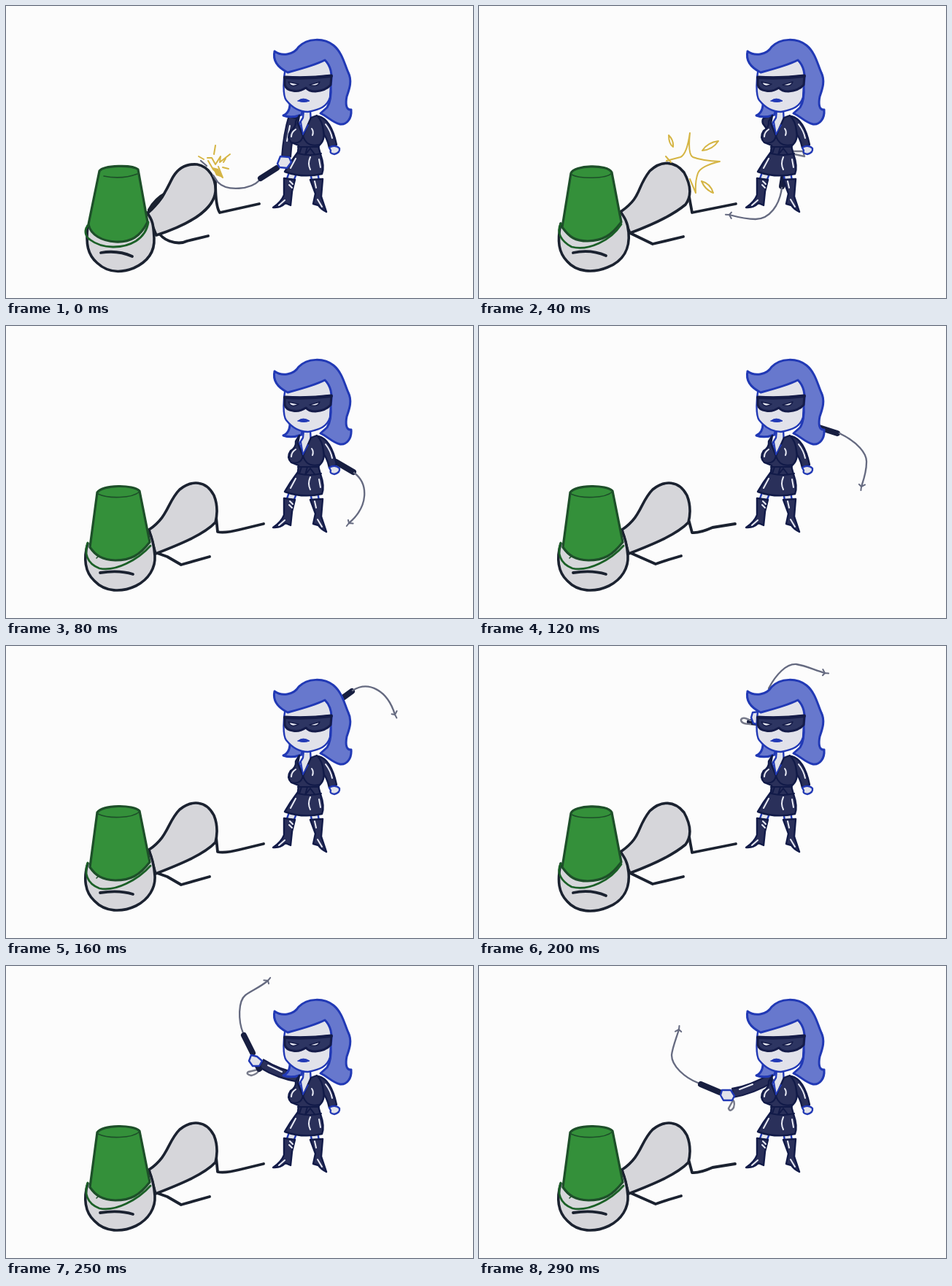
These frames come from a looping animation (640x400 px, 0.33 s). An HTML page:

```html
<!DOCTYPE html>
<html lang="en">
<head>
<meta charset="utf-8">
<title>Whip crack</title>
<style>
html, body { margin: 0; width: 100%; height: 100%; overflow: hidden; background: #fcfcfc; }
svg { display: block; width: 100%; height: 100%; }
path { stroke-linecap: round; stroke-linejoin: round; fill: none; }

/* One pose is visible for its own slice of the 330 ms loop. */
.pose { visibility: hidden; animation: show 330ms step-end calc((var(--at) - 330) * 1ms) infinite; }
.pose.long { animation-name: show-long; }
@keyframes show { 0% { visibility: visible; } 12.1212%, 100% { visibility: hidden; } }
@keyframes show-long { 0% { visibility: visible; } 15.1515%, 100% { visibility: hidden; } }

.body { fill: #d6d6da; stroke: #1b2230; stroke-width: 3.6; }
.shade { fill: #1b2230; stroke: #1b2230; stroke-width: 2; }
.limb { stroke: #1b2230; stroke-width: 3.8; }
.bucket { fill: #34903a; stroke: #1d4f29; stroke-width: 3.2; }
.rim { stroke: #1d4f29; stroke-width: 1.6; }
.strap { stroke: #1b6027; stroke-width: 2.8; }

.hair { fill: #6778cd; stroke: #2139b5; stroke-width: 3; }
.skin { fill: #e1e2ea; stroke: #2139b5; stroke-width: 2.4; }
.neck { stroke: #2139b5; stroke-width: 1.8; }
.suit { fill: #2a305a; stroke: #111a48; stroke-width: 2.4; }
.mask { fill: #2d3562; stroke: #151c49; stroke-width: 3; }
.band { stroke: #151c49; stroke-width: 4; }
.eyes { fill: #e8eaf4; stroke: #151c49; stroke-width: 1.5; }
.lips { fill: #2139b5; stroke: #2139b5; }
.seam { stroke: #111a48; stroke-width: 2; }
.shine { stroke: #e8eaf4; stroke-width: 2; }
.sleeve { stroke: #151c49; stroke-width: 14; stroke-linecap: butt; }
.sleeve + .sleeve { stroke: #2a305a; stroke-width: 9.5; }

.grip { stroke: #171e40; stroke-width: 8; }
.lash { stroke: #656a80; stroke-width: 2.3; }
.tail { marker-end: url(#fork); }
.loop { stroke: #777a8a; stroke-width: 2.4; }
.spark { stroke: #d5b544; stroke-width: 2; }
.ember { fill: #d5b544; }
</style>
</head>
<body>
<svg viewBox="0 0 640 400">
<defs>
  <marker id="fork" viewBox="-8 -8 16 16" markerWidth="16" markerHeight="16" markerUnits="userSpaceOnUse" orient="auto">
    <path d="M-4-4 0 0 5-1M0 0-2 4" stroke="#656a80" stroke-width="2"/>
  </marker>

  <g id="man-hit">
    <path class="limb" d="M287 240Q287 275 293 283L347 271M208 308Q213 318 224 322 238 327 248 322L277 315"/>
    <path class="body" d="M194 284C216 265 222 246 229 234 238 219 250 216 262 217 278 220 288 236 287 254 285 276 258 297 206 314Z"/>
    <path class="shade" d="M195 279Q204 263 218 256 212 270 195 281Z"/>
    <path class="body" d="M112 301C109 326 112 341 125 352 139 365 157 366 175 359 195 350 204 337 203 318 202 302 202 294 193 283"/>
    <path class="bucket" d="M128 226C134 218 174 217 181 224L194 296C184 316 171 324 150 323 132 322 116 314 113 299Z"/>
    <path class="rim" d="M134 233Q159 238 180 230"/>
    <path class="strap" d="M112 301C107 307 108 315 115 320 132 333 160 333 178 322Q193 312 195 296"/>
    <path class="limb" d="M130 338Q153 334 173 343"/>
  </g>

  <g id="man-b">
    <path class="limb" d="M288 261 292 283 352 271M207 311 238 326 280 316"/>
    <path class="body" d="M194 282C224 261 215 250 234 226 250 211 268 212 281 228 291 246 291 261 283 272 264 288 234 301 207 311Z"/>
    <path class="body" d="M112 298C107 322 109 338 121 350 134 365 157 366 176 358 199 349 207 331 205 310 204 296 199 289 194 282"/>
    <path class="bucket" d="M126 229C130 218 176 216 182 228L195 296C181 315 170 321 149 322 132 322 124 317 114 303Z"/>
    <path class="rim" d="M127 231C138 237 174 237 182 229"/>
    <path class="strap" d="M112 298C106 310 112 322 127 330 150 336 181 321 195 299"/>
    <path class="limb" d="M129 338Q153 333 174 342"/>
  </g>

  <g id="man-core">
    <path class="body" d="M196 279C223 261 221 241 238 224 254 211 274 211 285 232 291 247 289 261 287 269 271 286 236 300 205 312Z"/>
    <path class="body" d="M112 298C106 318 108 337 121 349 136 365 159 365 178 356 196 347 205 331 204 315 203 302 201 291 196 281"/>
    <path class="bucket" d="M125 228C133 217 175 217 183 226L197 296C183 314 171 321 150 321 132 320 123 315 115 303Z"/>
    <path class="rim" d="M126 230C141 237 173 236 183 227"/>
    <path class="strap" d="M112 297C107 310 110 325 128 332 150 337 181 320 198 301"/>
    <path class="limb" d="M129 338Q155 334 174 340"/>
    <path class="rim" d="M124 318 126 316"/>
  </g>
  <g id="man-c">
    <path class="limb" d="M288 268 292 283Q302 284 320 276L351 271M208 311 242 326 260 320 277 315"/>
    <use href="#man-core"/>
  </g>
  <g id="man-d">
    <path class="limb" d="M288 262 290 282Q300 284 320 279L353 271M207 311 221 316 240 327 279 316"/>
    <use href="#man-core"/>
  </g>
</defs>

<g class="pose" style="--at:40">
  <use href="#man-b"/>
  <path class="suit" d="M400 152Q386 151 389 161L397 172Z"/>
  <path class="grip" d="M417 235 415 247"/>
  <path class="lash tail" d="M415 249C412 273 398 292 379 292 365 292 354 289 343 286"/>
  <path class="loop" d="M430 199 444 199 446 206 432 203"/>
  <path class="spark" d="M289 174Q285 203 276 207L257 212M289 174Q286 203 293 207 306 212 330 213 304 219 300 229 296 240 297 256L289 237M256 206 263 214M260 177Q267 184 266 193 260 189 260 177ZM306 198Q313 187 328 185 320 197 306 198ZM305 240Q317 243 321 256 310 252 305 240Z"/>
</g>

<g class="pose" style="--at:80">
  <use href="#man-d"/>
  <path class="grip" d="M452 186 476 200"/>
  <path class="lash tail" d="M477 201C497 216 497 247 470 270"/>
</g>

<g class="pose" style="--at:120">
  <use href="#man-c"/>
  <path class="grip" d="M463 138 491 147"/>
  <path class="lash tail" d="M494 147C519 159 532 175 531 187 531 200 527 211 524 220"/>
</g>

<g class="pose" style="--at:160">
  <use href="#man-d"/>
  <path class="grip" d="M452 78 474 62"/>
  <path class="lash tail" d="M475 61C497 47 523 61 533 94"/>
</g>

<g class="pose long" style="--at:200">
  <use href="#man-b"/>
  <path class="lash tail" d="M397 58C407 39 421 24 435 25 448 27 460 33 474 37"/>
  <path class="grip" d="M371 104 380 105"/>
  <path class="loop" d="M372 107Q359 107 359 101 361 96 372 102"/>
  <path class="skin" d="M384 90 375 91 373 98 376 106 385 108Z"/>
</g>

<g class="pose" style="--at:250">
  <use href="#man-d"/>
  <path class="lash tail" d="M325 92C318 75 318 48 328 40 337 33 347 30 359 20"/>
  <path class="loop" d="M346 140Q348 147 336 150 328 148 332 145L345 142"/>
  <path class="sleeve" d="M402 153Q375 149 349 133"/><path class="sleeve" d="M402 153Q375 149 351 134"/>
  <path class="shine" d="M359 136 378 145"/>
  <path class="grip" d="M326 95 338 119M345 137 347 141"/>
  <path class="skin" d="M336 122 344 124 351 130 347 137 338 137 333 130Z"/>
</g>

<g class="pose" style="--at:290">
  <use href="#man-c"/>
  <path class="lash tail" d="M300 160C282 153 264 137 264 122 265 112 270 100 274 87"/>
  <path class="loop" d="M345 182Q352 184 349 194 344 201 342 195L347 186"/>
  <path class="sleeve" d="M402 153Q373 170 347 174"/><path class="sleeve" d="M402 153Q373 170 349 174"/>
  <path class="shine" d="M357 169 375 162"/>
  <path class="grip" d="M304 162 330 173"/>
  <path class="skin" d="M333 170 345 170 350 178 347 184 335 184 331 177Z"/>
</g>

<g class="pose" style="--at:0">
  <use href="#man-hit"/>
  <path class="sleeve" d="M394 150Q386 176 384 207"/><path class="sleeve" d="M393 154Q386 176 384 205"/>
  <path class="shine" d="M389 164 385 185"/>
</g>

<g id="woman">
  <path class="hair" d="M389 130Q390 146 380 150 391 154 405 149L408 136Z"/>
  <path class="skin" d="M408 142 407 153 402 161 407 179 418 160 417 143Z"/>
  <path class="skin" d="M383 84C380 100 379 122 384 129 392 139 403 145 414 145 430 142 440 138 444 125L447 86 436 72Z"/>
  <path class="hair" d="M368 62C379 70 395 66 401 56 413 44 435 43 449 54 461 64 464 80 469 91 475 103 470 115 467 124 465 134 466 143 473 142 474 154 467 163 458 162 446 159 442 152 431 147L440 139C445 131 446 122 445 108 448 92 445 82 437 74 421 82 405 86 386 91 374 85 365 76 368 62Z"/>
  <path class="mask" d="M382 97Q414 99 446 95L445 108Q438 116 424 117 415 117 411 112 402 118 393 116 384 115 382 108Z"/>
  <path class="band" d="M382 98Q414 100 446 96"/>
  <path class="eyes" d="M387 104 401 107Q391 113 387 104ZM416 108 430 104Q427 112 416 108Z"/>
  <path class="lips" d="M400 130Q407 124 416 130 408 133 400 130Z"/>

  <path class="suit" d="M428 151C441 154 449 171 453 190L443 194Q440 179 431 170Z"/>
  <path class="shine" d="M438 162Q445 171 447 181"/>
  <path class="skin" d="M443 194Q451 189 457 195 458 201 450 203 443 202 445 198Z"/>
  <path class="skin" d="M388 228 384 239 394 240 398 230ZM417 227 419 239 429 239 427 227Z"/>
  <path class="suit" d="M402 150 397 158Q398 166 390 171 384 180 391 187L401 191 400 200 390 214 382 227Q407 236 433 230 437 220 431 203L428 192Q438 184 435 171 434 158 426 150L418 153 407 178 400 161Z"/>
  <path class="seam" d="M407 178Q404 190 392 187M407 178Q412 194 429 190M400 193 429 193M400 202Q416 206 432 202M405 193 402 202M413 193 410 204 417 195 423 203"/>
  <path class="neck" d="M404 158 407 176 414 163"/>
  <path class="shine" d="M397 169Q391 173 391 179M419 168Q422 172 420 177M397 209 390 222M417 207Q413 216 417 224M429 210 431 221"/>
  <path class="suit" d="M381 236 396 238 392 254 390 273 383 270Q376 277 366 276 377 269 381 259ZM417 238 434 237 432 261 439 282Q431 278 428 273L421 271 424 257Z"/>
  <path class="shine" d="M389 240 393 244M388 245 392 249M382 266 374 273M423 240 425 249M427 265 433 275"/>
</g>

<g class="pose" style="--at:0">
  <path class="lash" d="M347 239C336 251 303 255 290 241L284 232M267 212 275 219"/>
  <path class="grip" d="M349 236 371 222"/>
  <path class="skin" d="M376 206 388 207 391 214 385 222 375 221 372 216Z"/>
  <path class="spark" d="M287 191 285 203M264 206 271 210M276 208 282 208 287 217 294 206 293 214 307 203M301 209 298 214M297 221 305 223M277 212 284 224 297 235 291 220"/>
  <path class="ember" d="M283 221 291 223 297 235 288 232Z"/>
</g>
</svg>
</body>
</html>
```
